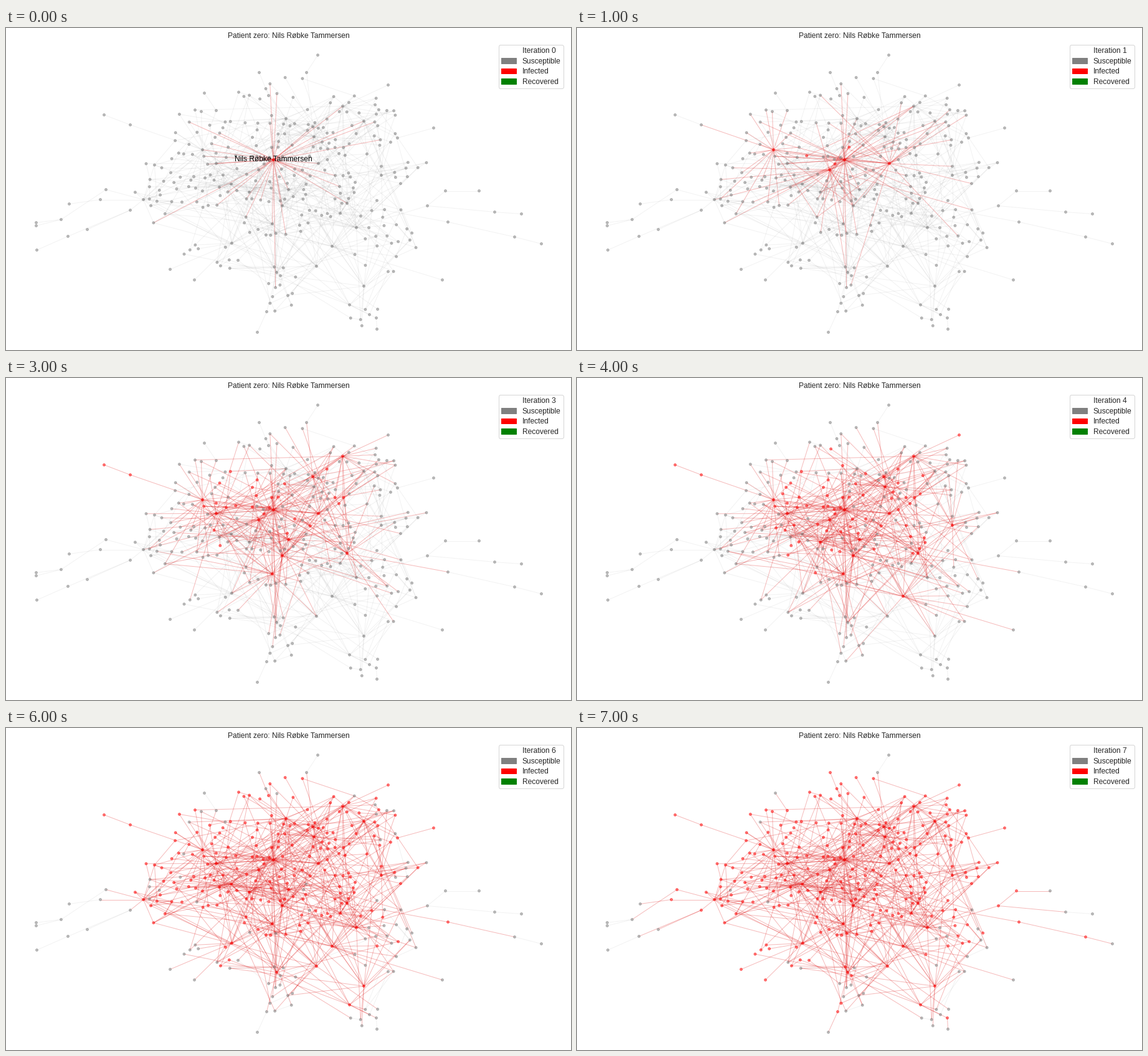
A matplotlib script for the animation above (8000 ms loop, 907x517 px).

```python
import math

import matplotlib.pyplot as plt
import numpy as np
from matplotlib.animation import FuncAnimation
from matplotlib.collections import LineCollection
from matplotlib.patches import Patch

W, H, DPI = 907, 517, 72
STEPS = 8
NAME = "Nils Røbke Tammersen"
ZERO = (429, 211)
CENTER = (440, 262)

plt.rcParams.update({"font.family": "Liberation Sans", "font.size": 12,
                     "text.color": ".15"})
rng = np.random.default_rng(12)

# Best connected people, by step of infection
HUBS = {
    0: [ZERO],
    1: [(315, 195), (501, 217), (405, 227)],
    2: [(492, 158), (547, 281)],
    3: [(337, 217), (453, 259), (443, 285), (427, 314), (540, 125)],
    4: [(494, 174), (390, 263), (523, 350), (602, 236)],
    5: [(342, 255), (361, 250), (498, 382), (574, 149), (362, 345),
        (574, 414)],
    6: [(562, 320), (536, 297), (220, 275), (449, 145), (434, 392),
        (551, 444)],
}

# Clouds of other people: center, radii, size
CLOUDS = [
    (425, 235, 140, 100, 116), (565, 150, 70, 60, 30),
    (300, 165, 55, 45, 13), (250, 260, 52, 55, 21),
    (330, 368, 48, 25, 10), (638, 225, 45, 27, 9),
    (605, 335, 55, 60, 24), (440, 418, 28, 38, 13),
    (576, 462, 26, 22, 6), (450, 108, 85, 32, 12),
]

wave_of = {p: wave for wave, points in HUBS.items() for p in points}
hubs = list(wave_of)
links = []


def chain(wave, root, *points):
    """Link points in a row, each infected one step after the last."""
    for p in points:
        wave_of[p] = wave
        links.append((root, p))
        root, wave = p, wave + 1


def pick(p, pool, count, reach):
    """Choose random members of the pool, mostly close to p."""
    pool = [q for q in pool if q != p]
    d = np.array([math.hypot(0.75 * (q[0] - p[0]), q[1] - p[1])
                  for q in pool])
    weight = np.exp(-(d - d.min()) / reach)
    chosen = rng.choice(len(pool), count, replace=False,
                        p=weight / weight.sum())
    return [pool[i] for i in chosen]


def link(p, pool, count, reach):
    links.extend((p, q) for q in pick(p, pool, count, reach))


# Long outer arms
chain(2, (315, 195), (199, 155), (157, 139))
chain(4, (540, 125), (613, 91))
chain(6, (449, 145), (421, 108), (406, 71))
chain(8, (492, 158), (482, 71), (500, 43))
chain(7, (315, 195), (337, 132), (318, 104))
chain(5, (574, 149), (628, 176), (686, 160))
chain(7, (562, 320), (676, 285), (784, 295), (827, 298))
chain(7, (676, 285), (705, 261), (759, 261))
chain(6, (547, 281), (709, 311), (816, 335), (859, 346))
chain(8, (523, 350), (700, 404))
chain(7, (220, 275), (160, 259), (88, 307), (48, 312))
chain(9, (88, 307), (48, 317))
chain(7, (220, 275), (199, 292), (99, 334), (49, 356))
chain(8, (199, 292), (130, 323))
chain(7, (220, 275), (151, 275), (101, 282))
chain(7, (362, 345), (263, 387))
chain(7, (362, 345), (302, 404))
chain(7, (434, 392), (418, 455), (403, 488))
chain(7, (551, 444), (594, 465), (595, 483))

crowd = []
for cx, cy, rx, ry, size in CLOUDS:
    goal = len(crowd) + size
    while len(crowd) < goal:
        angle, r = rng.uniform(0, 2 * math.pi), math.sqrt(rng.uniform())
        p = (cx + rx * r * math.cos(angle), cy + ry * r * math.sin(angle))
        if all(math.dist(p, q) > 7 for q in crowd + list(wave_of)):
            crowd.append(p)


def reached(p):
    """How late the infection gets to p, with some luck."""
    d = math.hypot(0.7 * (p[0] - ZERO[0]), p[1] - ZERO[1])
    return d + rng.normal(0, 45)


# The share of infected people grows along a logistic curve
for i, p in enumerate(sorted(crowd, key=reached)):
    share = (i + 0.5) / len(crowd)
    step = 5.15 + math.log(share / (1 - share)) / 1.05
    wave_of[p] = max(1, math.ceil(step))

people = hubs + crowd
for p in hubs:
    link(p, people, round(4 + 14 * math.exp(-math.dist(p, CENTER) / 110)), 60)
for p in crowd:
    link(p, hubs, 1, 45)
for p in crowd[::2]:
    link(p, people, 1, 35)
link(ZERO, people, 12, 60)
links += [(ZERO, p) for p in hubs if 0 < wave_of[p] <= 3]
links = list(dict.fromkeys(tuple(sorted(pair)) for pair in links))

nodes = np.array(list(wave_of), float) + 0.5
node_wave = np.array(list(wave_of.values()))
link_wave = np.array([min(wave_of[a], wave_of[b]) for a, b in links])

LINK_GRAY, LINK_RED = (0.5, 0.5, 0.5, 0.1), (0.88, 0.1, 0.1, 0.3)
NODE_GRAY, NODE_RED = (0.5, 0.5, 0.5, 0.5), (1, 0, 0, 0.5)

fig = plt.figure(figsize=(W / DPI, H / DPI), dpi=DPI, facecolor="white")
ax = fig.add_axes([0, 0, 1, 1])
ax.set(xlim=(0, W), ylim=(H, 0))
ax.axis("off")

lines = LineCollection(np.array(links, float) + 0.5, linewidths=1, zorder=1)
ax.add_collection(lines, autolim=False)
dots = ax.scatter(nodes[:, 0], nodes[:, 1], s=15, linewidths=1, zorder=2)
label = ax.text(*ZERO, NAME, color="black", ha="center", va="center",
                zorder=3)
ax.text(453.6, 15.8, "Patient zero: " + NAME, ha="center", va="baseline")

entries = [("white", "Iteration 0"), ("gray", "Susceptible"),
           ("red", "Infected"), ("green", "Recovered")]
legend = ax.legend(handles=[Patch(color=c, label=t) for c, t in entries],
                   loc="upper right", bbox_to_anchor=(900.5, 21.3),
                   bbox_transform=ax.transData, fontsize=12,
                   labelspacing=0.37, borderpad=0.34,
                   edgecolor="0.8", framealpha=0.8)
counter = legend.get_texts()[0]


def tint(waves, step, red, gray):
    return np.where((waves <= step)[:, None], red, gray)


def draw(step):
    lines.set_color(tint(link_wave, step, LINK_RED, LINK_GRAY))
    colors = tint(node_wave, step, NODE_RED, NODE_GRAY)
    dots.set_facecolor(colors)
    dots.set_edgecolor(colors)
    label.set_visible(step == 0)
    counter.set_text(f"Iteration {step}")
    return lines, dots, label, counter


anim = FuncAnimation(fig, draw, frames=STEPS, init_func=lambda: draw(0),
                     interval=1000, repeat=True, repeat_delay=0)
plt.show()
```
